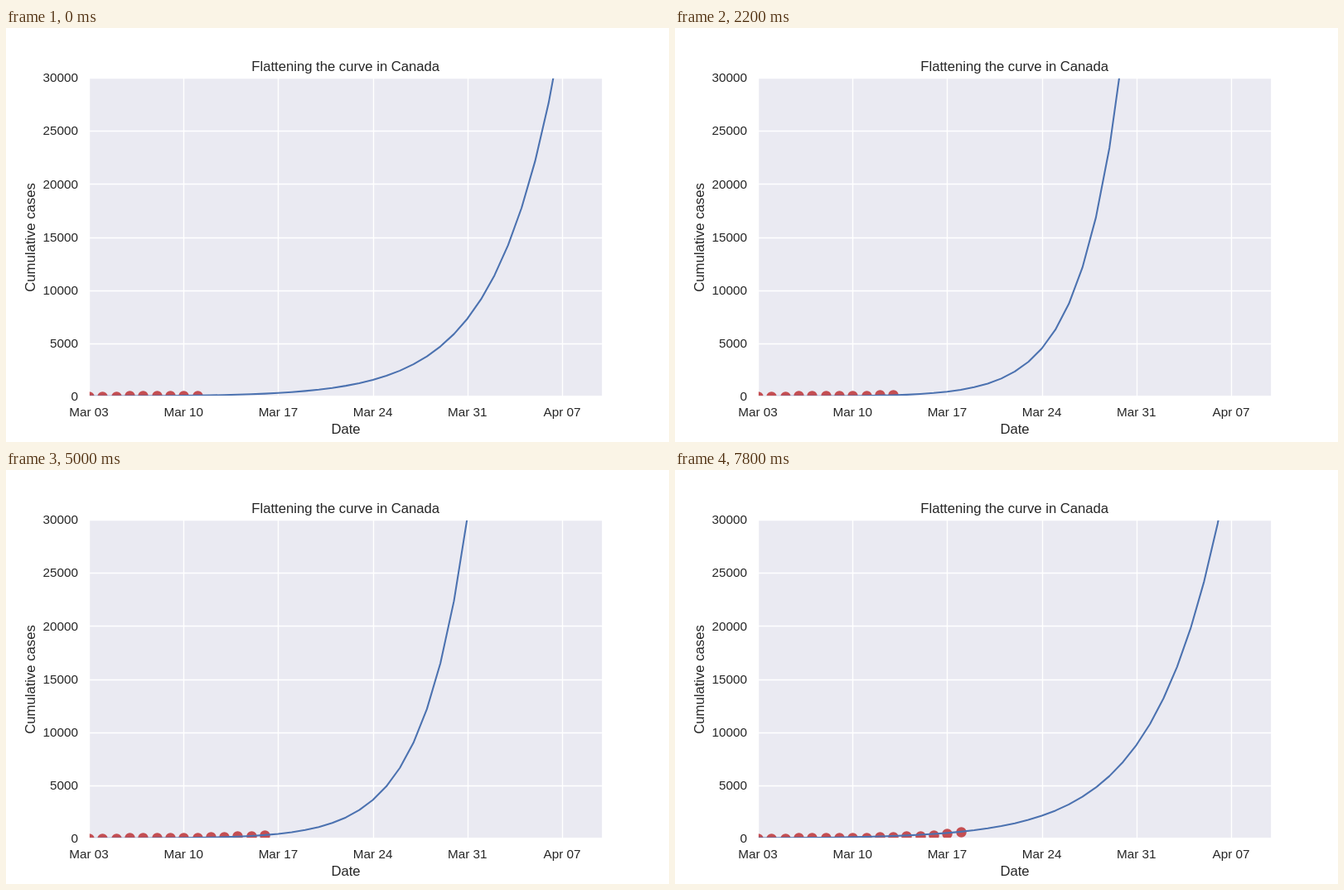
These frames come from a looping animation (800x500 px, 8000 ms). An HTML page:

```html
<!DOCTYPE html>
<html lang="en">
<head>
<meta charset="utf-8">
<title>Flattening the curve</title>
<style>
  html, body { margin: 0; width: 100%; height: 100%; overflow: hidden; background: #fff; }
  svg { display: block; width: 800px; height: 500px; }
  text { font-family: "Liberation Sans", Arial, sans-serif; font-size: 16.67px; fill: #262626; text-anchor: middle; }
  .tick { font-size: 15.28px; }
  .value { text-anchor: end; }
  .grid { stroke: #fff; stroke-width: 1.39; }
  .frame { fill: none; stroke: #fff; stroke-width: 1.74; }
  #curve { fill: none; stroke: #4c72b0; stroke-width: 2.08; stroke-linejoin: round; }
  #dots { fill: #c44e52; }
</style>
</head>
<body>
<svg viewBox="0 0 800 500">
  <clipPath id="plot"><rect x="100" y="60" width="620" height="385"/></clipPath>
  <rect x="100" y="60" width="620" height="385" fill="#eaeaf2"/>
  <g clip-path="url(#plot)">
    <g id="grid"></g>
    <g id="dots"></g>
    <polyline id="curve"/>
  </g>
  <rect class="frame" x="100" y="60" width="620" height="385"/>
  <g id="labels"></g>
  <text x="409.7" y="52">Flattening the curve in Canada</text>
  <text x="410" y="490">Date</text>
  <text transform="translate(35 253) rotate(-90)">Cumulative cases</text>
</svg>
<script>
const STEP = 200, STEPS_PER_DAY = 5, LOOP = 8000;
const DAYS = 38, MAX_CASES = 30000, FIRST_VISIBLE = 9;

const cases = [30, 33, 37, 49, 54, 64, 77, 79, 103, 138, 176, 244, 252, 324, 441, 598];

// Fitted [cases at day 0, daily growth rate], one per day boundary.
const fits = [
  [15.01, .2211], [6.305, .2975], [4.514, .3295], [4.592, .3262], [5.754, .309],
  [6.19, .3034], [9.63, .2725], [16.8, .235], [34.05, .194]
];

const byId = id => document.getElementById(id);
const xOf = day => 100 + day * 620 / DAYS;
const yOf = count => 445 - count * 385 / MAX_CASES;
const snap = v => Math.round(v) + .5;

function add(parent, tag, attributes, text = "") {
  const node = document.createElementNS("http://www.w3.org/2000/svg", tag);
  for (const key in attributes) node.setAttribute(key, attributes[key]);
  node.textContent = text;
  return byId(parent).appendChild(node);
}

["Mar 03", "Mar 10", "Mar 17", "Mar 24", "Mar 31", "Apr 07"].forEach((label, week) => {
  const x = xOf(week * 7);
  add("grid", "line", { class: "grid", x1: snap(x), x2: snap(x), y1: 60, y2: 445 });
  add("labels", "text", { class: "tick", x, y: 469 }, label);
});

for (let count = 0; count <= MAX_CASES; count += 5000) {
  const y = yOf(count);
  add("grid", "line", { class: "grid", x1: 100, x2: 720, y1: snap(y), y2: snap(y) });
  add("labels", "text", { class: "tick value", x: 87, y: Math.round(y + 5.2) }, count);
}

const dots = cases.map((count, day) =>
  add("dots", "circle", { cx: snap(xOf(day)), cy: snap(yOf(count)), r: 6.25 }));

function draw(time) {
  const progress = Math.floor(time % LOOP / STEP) / STEPS_PER_DAY;
  const index = Math.floor(progress), part = progress - index;
  const [start, rate] = fits[index].map((v, i) => v + (fits[index + 1][i] - v) * part);

  const points = [];
  for (let day = 0; day <= DAYS; day++)
    points.push(xOf(day).toFixed(2) + "," + yOf(start * Math.exp(rate * day)).toFixed(2));
  byId("curve").setAttribute("points", points.join(" "));

  dots.forEach((dot, day) =>
    dot.setAttribute("visibility", day < FIRST_VISIBLE + index ? "visible" : "hidden"));
}

const startTime = performance.now();
function tick() {
  draw(performance.now() - startTime);
  requestAnimationFrame(tick);
}
tick();
</script>
</body>
</html>
```
